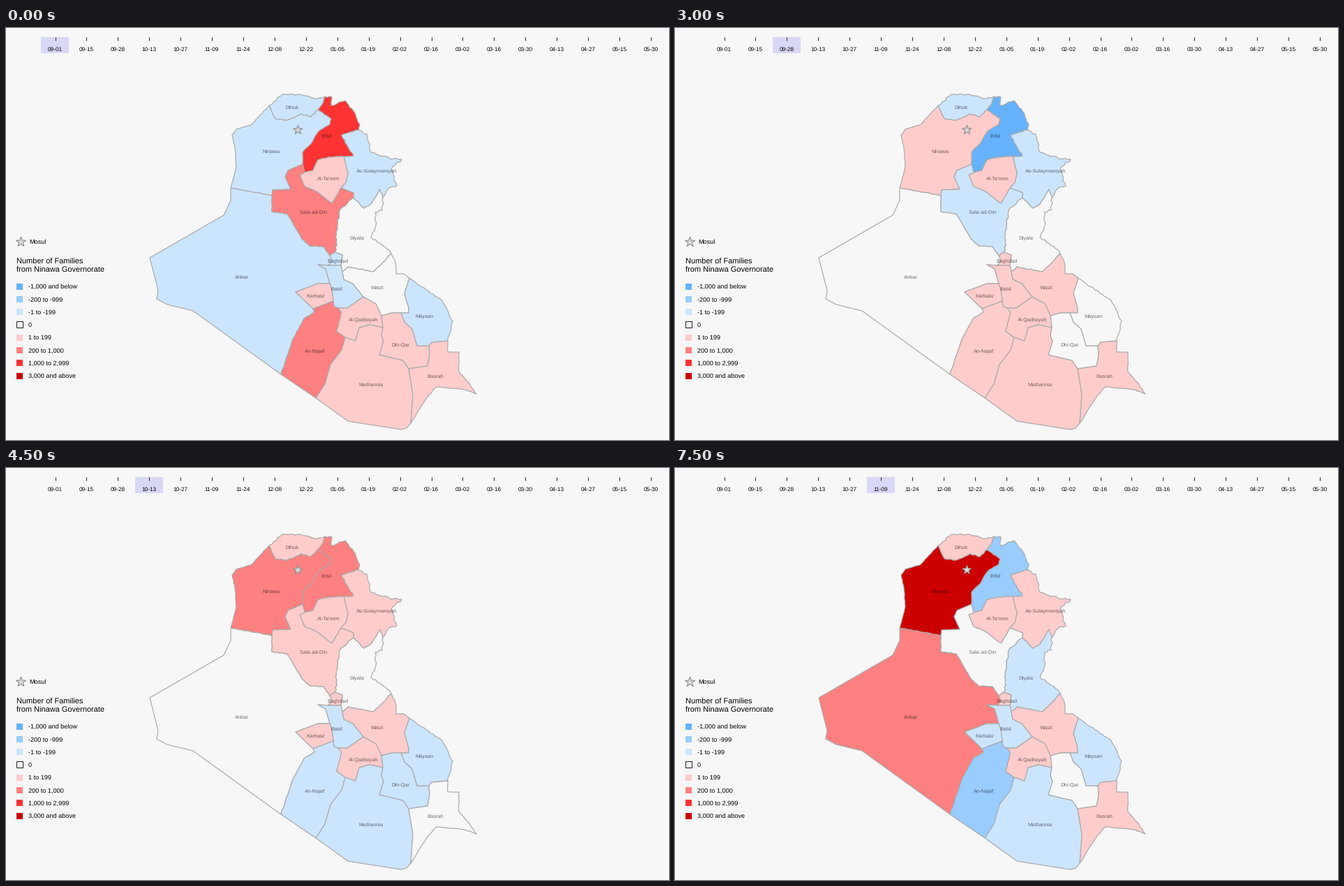
A matplotlib script that plays this animation: 950x590 px, repeating every 8 s.

```python
import numpy as np
import matplotlib.pyplot as plt
from matplotlib.animation import FuncAnimation
from matplotlib.patches import Polygon, Rectangle

W, H, DPI = 950, 590, 100
PX = 72 / DPI
BG = "#f7f7f7"
STEP_FRAMES = 3

# Fill colours for change levels -3 .. 4
COLORS = ["#66b2ff", "#99ccff", "#cce5ff", BG,
          "#ffcccc", "#ff8080", "#ff3333", "#cc0000"]
RANGES = ["-1,000 and below", "-200 to -999", "-1 to -199", "0",
          "1 to 199", "200 to 1,000", "1,000 to 2,999", "3,000 and above"]
DATES = ("09-01 09-15 09-28 10-13 10-27 11-09 11-24 12-08 12-22 01-05 "
         "01-19 02-02 02-16 03-02 03-16 03-30 04-13 04-27 05-15 05-30").split()

# Junctions where borders meet
NODES = dict(
    A=(377, 111), B=(447, 117), C=(457, 98), D=(505, 146), E=(484, 184),
    G=(425, 195), H=(428, 207), I=(480, 229), J=(498, 243), K=(540, 243),
    L=(471, 321), M=(464, 326), N=(381, 240), O=(322, 229), P=(462, 340),
    Q=(480, 340), R=(482, 349), S=(552, 323), T=(578, 358), U=(566, 408),
    V=(538, 412), W=(512, 385), X=(476, 401), Y=(469, 391), Z=(464, 366),
    a=(440, 402), b=(394, 496), c=(444, 530), d=(486, 443), e=(540, 429),
    f=(577, 488), g=(606, 455), h=(633, 448), i=(580, 566))

rng = np.random.default_rng(4)
borders = {}


def crinkle(pts, rough, step=4):
    """Cut a line into short steps and push each one sideways at random."""
    out = [pts[0]]
    for p, q in zip(pts[:-1], pts[1:]):
        d = q - p
        size = np.hypot(*d)
        side = np.array([-d[1], d[0]]) / size
        n = max(1, round(size / step))
        out += [p + d * k / n + side * rng.uniform(-rough, rough)
                for k in range(1, n)]
        out.append(q)
    return np.array(out)


def border(ends, *via, rough=0):
    """Join two junctions through a few key points."""
    pts = np.array([NODES[ends[0]], *via, NODES[ends[1]]], float)
    if rough:
        pts = crinkle(pts, rough)
    borders[ends] = pts
    borders[ends[::-1]] = pts[::-1]


# Outer border, clockwise from the north-west
border("AC", (396, 95), (422, 95), (446, 101), rough=1.2)
border("CD", (467, 99), (466, 111), (486, 104), (498, 119), (507, 138), rough=1.2)
border("DK", (517, 152), (523, 178), (538, 184), (567, 188), (552, 202),
       (560, 226), (546, 232), rough=1.8)
border("KS", (539, 261), (529, 264), (530, 283), (523, 300), (549, 318), rough=1.5)
border("ST", (558, 336), (559, 352), (569, 352), rough=0.8)
border("Th", (602, 375), (625, 390), (640, 420), rough=1)
border("hi", (633, 464), (649, 464), (649, 492), (662, 507), (674, 524),
       (658, 518), (616, 514), (602, 531), rough=0.5)
border("ic", (574, 573), (566, 575), (490, 563))
border("cb")
border("bO", (268, 405), (231, 396), (216, 388), (218, 376), (206, 329),
       (312, 268), (322, 247))
border("OA", (330, 198), (328, 172), (324, 153), (330, 145), (351, 139), rough=0.4)

# Northern borders
border("AB", (386, 130), (403, 132), (423, 123), (437, 127), rough=0.8)
border("CB", (454, 108))
border("BG", (466, 130), (464, 138), (448, 148), (437, 166), (425, 178), rough=0.6)
border("GN", (404, 204), (400, 213), (408, 231), (382, 232))
border("ON", (350, 234), rough=0.5)
border("DE", (481, 153), (486, 164), (498, 183), rough=0.8)
border("EH", (462, 185), (447, 189), (440, 204), rough=0.5)
border("GH")
border("HI", (421, 210), (428, 227), (446, 235), (467, 251), rough=0.5)
border("EI", (490, 208), (487, 221))
border("IJ", (498, 236))
border("JL", (479, 259), (473, 292), (474, 311), rough=1.2)
border("JK", (513, 258), (523, 252), (536, 231), rough=0.8)
border("NM", (381, 263), (403, 266), (424, 302), (435, 312), (455, 313), rough=0.5)

# Central borders
border("ML")
border("LQ", (482, 325))
border("MP", (467, 333))
border("PQ")
border("PZ", (447, 339), (458, 345))
border("QR")
border("RS", (490, 342), (527, 349), (540, 336), rough=0.6)
border("RW", (484, 360), (497, 366))
border("Za", (447, 366), (415, 378))
border("ZY", (467, 375))
border("aY")
border("YX", (470, 399))
border("XW", (489, 401))
border("WV", (530, 395))

# Southern borders
border("ab", (442, 407), (427, 416), (411, 446), (401, 475), rough=0.4)
border("Xd", (481, 407), (474, 434), rough=0.8)
border("dc", (481, 461), (465, 482), (457, 510))
border("de", (501, 448), (506, 429), (521, 425))
border("Ve")
border("VU", (553, 408))
border("TU", (571, 380), (577, 401), (577, 408))
border("Ug", (571, 421), (582, 431), (589, 455))
border("gh", (610, 450))
border("gf", (607, 468), (604, 484))
border("ef", (538, 440), (541, 449), (535, 468), (569, 476))
border("fi", (583, 525))

# Label, its centre, junctions around the area, level at each date
AREAS = [
    ("Anbar", 338, 357, "bONMPZa", (-1, -1, 0, 0, 0, 2)),
    ("Diyala", 503, 300, "JKSRQL", (0, 0, 0, 0, 0, -1)),
    ("Dihuk", 410, 114, "ACB", (-1, 1, -1, 1, -1, 1)),
    ("Ninawa", 380, 177, "OABGN", (-1, 2, 1, 2, 3, 4)),
    ("Erbil", 459, 155, "CDEHGB", (3, 2, -3, 2, -3, -2)),
    ("As-Sulaymaniyah", 531.5, 204, "DKJIE", (-1, -1, -1, 1, -1, 1)),
    ("Al-Ta'mim", 462, 216, "EIH", (1, 1, 1, 1, 1, 1)),
    ("Sala ad-Din", 441, 264, "GHIJLMN", (2, -1, -1, 1, 1, 0)),
    ("Baghdad", 475, 333, "MLQP", (-1, 1, 1, 1, 1, 1)),
    ("Babil", 474, 374, "PQRWXYZ", (-1, 0, 1, -1, -1, -1)),
    ("Karbala'", 444, 384, "ZYa", (1, 1, 1, 1, -1, -1)),
    ("Wasit", 532, 372, "STUVWR", (0, -1, 1, 1, 1, 1)),
    ("An-Najaf", 443, 462, "aYXdcb", (2, -2, 1, -1, 2, -2)),
    ("Al-Qadisiyah", 512, 417, "XWVed", (1, 1, 1, 1, 1, 1)),
    ("Muthannia", 523, 511, "defic", (1, 1, 1, -1, -1, -1)),
    ("Dhi-Qar", 566, 453, "VUgfe", (1, 0, 0, -1, -1, 0)),
    ("Maysan", 600, 413, "ThgU", (-1, 1, 0, -1, -1, -1)),
    ("Basrah", 615, 499, "ghif", (1, 1, 1, 0, -1, 1)),
]


def ring(names):
    pairs = zip(names, names[1:] + names[0])
    return np.vstack([borders[p + q][:-1] for p, q in pairs])


plt.rcParams["font.family"] = "Liberation Sans"
plt.rcParams["text.hinting"] = "none"
fig = plt.figure(figsize=(W / DPI, H / DPI), dpi=DPI, facecolor=BG)
ax = fig.add_axes([0, 0, 1, 1])
ax.set(xlim=(0, W), ylim=(H, 0))
ax.axis("off")


def text(x, y, s, size, ha="left", **kw):
    """Write text whose capitals are centred on height y."""
    ax.text(x, y + 0.34 * size, s, fontsize=size * PX, ha=ha, va="baseline", **kw)


def star(x, y, r):
    k = np.arange(10)
    rad = np.where(k % 2, 0.4 * r, r)
    pts = np.column_stack([x + rad * np.sin(k * np.pi / 5),
                           y - rad * np.cos(k * np.pi / 5)])
    ax.add_patch(Polygon(pts, fc="#d9d9d9", ec="#888888", lw=PX, zorder=4))


def tick_x(i):
    return 70.5 + 44.92 * i


# Timeline
marker = ax.add_patch(Rectangle((0, 12.5), 40, 23.5, fc="#d8d8f6", lw=0))
for i, date in enumerate(DATES):
    x = tick_x(i)
    ax.plot([x, x], [12.5, 18], color="#222222", lw=PX, solid_capstyle="butt")
    text(x, 30.2, date, 8.3, "center")

# Map
shapes = []
for label, x, y, names, levels in AREAS:
    shape = Polygon(ring(names), ec="#aaaaaa", lw=1.2 * PX, joinstyle="round",
                    zorder=2)
    shapes.append(ax.add_patch(shape))
    text(x, y - 0.3, label, 7.5, "center", alpha=0.55, zorder=3)
star(418.3, 146, 7)

# Legend
star(21.5, 306.5, 7.5)
text(33, 306, "Mosul", 9.2)
text(15, 334.6, "Number of Families", 11)
text(15, 346.6, "from Ninawa Governorate", 11)
for i, (color, name) in enumerate(zip(COLORS, RANGES)):
    y = 370 + 18.3 * i
    outline = PX if color == BG else 0
    ax.add_patch(Rectangle((15, y - 4.5), 9, 9, fc=color, ec="#222222", lw=outline))
    text(32, y, name, 9.2)


def draw(frame):
    step = frame // STEP_FRAMES
    marker.set_x(tick_x(step) - 20.5)
    for shape, (*_, levels) in zip(shapes, AREAS):
        shape.set_facecolor(COLORS[levels[step] + 3])
    return [marker, *shapes]


anim = FuncAnimation(fig, draw, frames=16, interval=500, repeat=True,
                     repeat_delay=0, init_func=lambda: draw(0))
plt.show()
```
